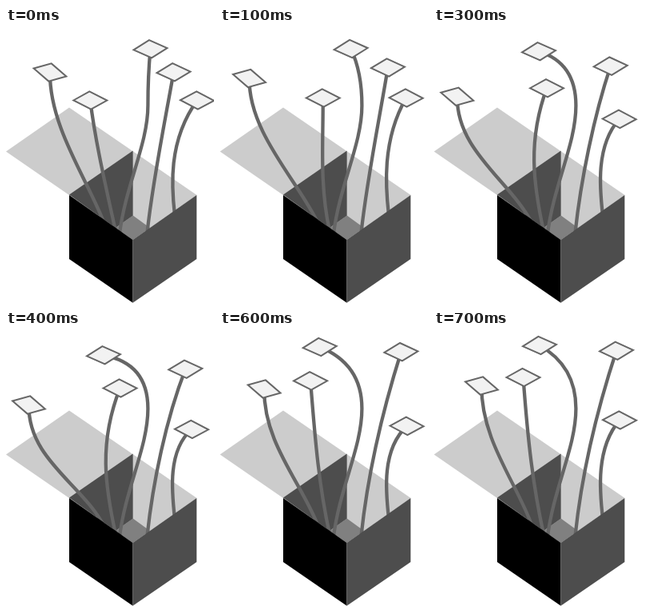
An HTML page that plays this animation: 260x344 px, repeating every 0.8 s.

```html
<!DOCTYPE html>
<html lang="en">
<head>
<meta charset="utf-8">
<title>Box of stems</title>
<style>
html, body { margin: 0; width: 100%; height: 100%; overflow: hidden; background: #fff; }
svg { display: block; width: 260px; height: 344px; }
#stems { fill: none; stroke: #666; stroke-width: 4.300; }
#heads { fill: #f2f2f2; stroke: #666; stroke-width: 2; }
</style>
</head>
<body>
<svg viewBox="0 0 260 344">
  <path fill="#ccc" d="M0 154.500L79 99.500L238.500 209L158.500 265L137 250L79 209Z"/>
  <path fill="#4d4d4d" d="M79 208.500L158.600 153.500V235L137 250Z"/>
  <path fill="#808080" d="M158.600 234.500L180 250L158.500 265L137 250Z"/>
  <g id="stems"></g>
  <path d="M79 209L158.500 265V343.700L79 289Z"/>
  <path fill="#4d4d4d" d="M158.500 265L238.300 209V289L158.500 343.700Z"/>
  <g id="heads"></g>
</svg>
<script>
const STEP = 100, STEPS = 8;
const HEAD = 'M-21 0L-1 -11.2L21 0L1 11.2Z';
const KEY_STEPS = [0, 2, 4, 5, 7, STEPS];

// keys: head centres at KEY_STEPS; stem: curve from the centre down into the box
const flowers = [
  {
    tilt: 14,
    keys: [[55, 55.5], [30.5, 65.5], [28.5, 92.5], [42.5, 84.5], [59.5, 68.5]],
    stem: (x, y) => `C${x - 1} ${y + 68} ${88 + 0.28 * x} 192 123 245`
  },
  {
    tilt: 0,
    keys: [[105.3, 90.5], [136.5, 86.5], [142.5, 71.5], [118, 75.5], [111.5, 58]],
    stem: x => `C${132 - Math.abs(126 - x)} 140 124 195 137 254`
  },
  {
    tilt: -3,
    keys: [[180.5, 26.3], [158, 26], [122, 30.3], [103, 26], [132, 18]],
    stem: x => `Q177.400 ${60 - 0.35 * Math.max(0, 178 - x)} 177.400 97C177.400 145 150 195 142 257`
  },
  {
    tilt: -2,
    keys: [[209.5, 55.3], [210, 47.5], [224.3, 47.7], [221.5, 30.5], [228, 24.7]],
    stem: () => 'C200 110 183.500 190 176.500 256'
  },
  {
    tilt: 1,
    keys: [[239, 90.5], [230.5, 86.5], [232, 123], [238, 141], [232, 111.5]],
    stem: (x, y) => `C202 ${120 + 0.24 * y} 207 200 211 235`
  }
];

function addPath(id) {
  const path = document.createElementNS('http://www.w3.org/2000/svg', 'path');
  return document.getElementById(id).appendChild(path);
}

for (const f of flowers) {
  f.line = addPath('stems');
  f.head = addPath('heads');
  f.head.setAttribute('d', HEAD);
}

const easeOut = u => 1 - (1 - u) ** 2;

function draw(now) {
  const step = Math.floor(now / STEP) % STEPS;
  const i = KEY_STEPS.findLastIndex(k => k <= step);
  const u = easeOut((step - KEY_STEPS[i]) / (KEY_STEPS[i + 1] - KEY_STEPS[i]));
  for (const { keys, tilt, stem, line, head } of flowers) {
    const next = keys[(i + 1) % keys.length];
    const [x, y] = keys[i].map((v, n) => v + (next[n] - v) * u);
    line.setAttribute('d', `M${x} ${y}${stem(x, y)}`);
    head.setAttribute('transform', `translate(${x} ${y}) rotate(${tilt})`);
  }
}

const start = performance.now();
function tick() {
  draw(performance.now() - start);
  requestAnimationFrame(tick);
}
tick();
</script>
</body>
</html>
```
